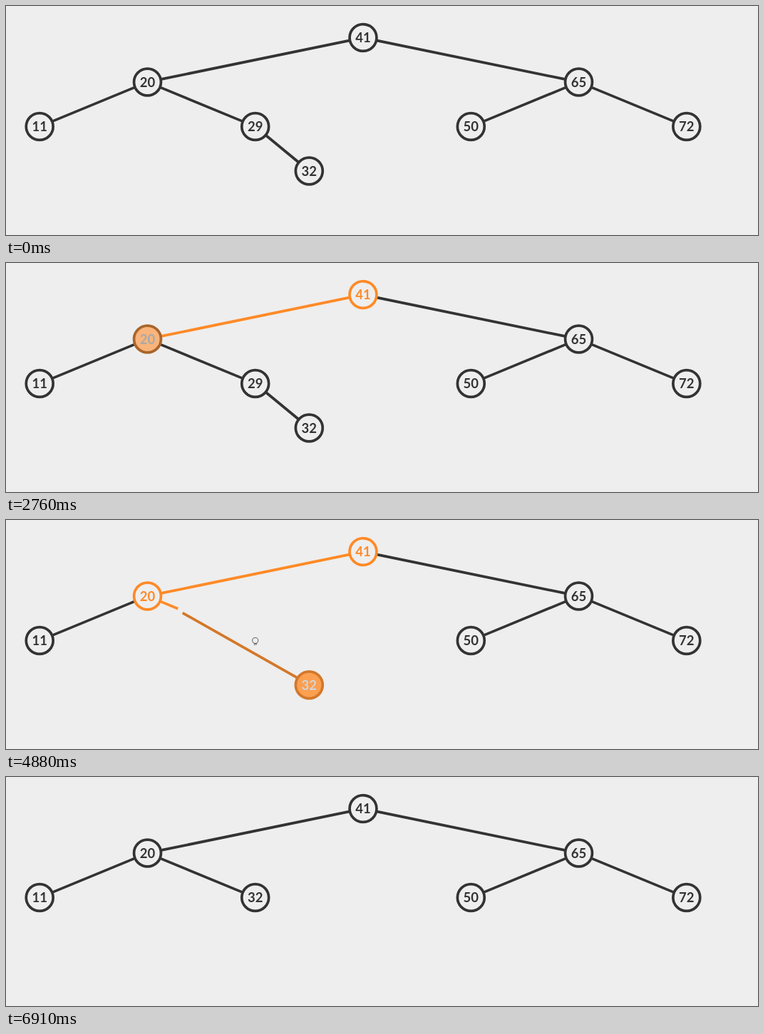
An HTML page for the animation above (7380 ms loop, 1055 by 322 pixels).

```html
<!DOCTYPE html>
<html lang="en">
<head>
<meta charset="utf-8">
<title>Deleting 29 from a binary search tree</title>
<style>
  html, body { margin: 0; width: 100%; height: 100%; overflow: hidden; background: #eee; }
  svg { display: block; width: 1055px; height: 322px; }
  line { stroke: #333; stroke-width: 3.75px; }
  circle { fill: #eee; stroke: #333; }
  text { fill: #333; font-family: Lato, "Open Sans", sans-serif; font-weight: 700; text-anchor: middle; }
</style>
</head>
<body>
<svg id="tree" viewBox="0 0 1055 322"></svg>
<script>
const LOOP = 7380, MOVE = 500, FIRST = 1650;
const RING = 18.95, WEIGHT = 3.7, SIZE = 18.5, TRIM = 20;

// Start time of each step of the deletion
const STEP = { visit41: 1467, to20: 1974, visit20: 2496, to29: 3012, visit29: 3526,
               found: 4048, unlink: 4568, lift: 5080, reset: 5597 };

// Colours: fill, ring, ink
const DARK = [51, 51, 51], PALE = [238, 238, 238], HOT = [255, 138, 39], WHITE = [255, 255, 255];
const BASE = [PALE, DARK, DARK], FULL = [HOT, HOT, WHITE], LIT = [PALE, HOT, HOT];

const SPOT = {
  41: [501, 44.5], 20: [198.5, 107], 65: [803.5, 107], 11: [47.2, 169.5],
  29: [349.7, 169.5], 50: [652.3, 169.5], 72: [954.8, 169.5], 32: [425.3, 232]
};

const svg = document.getElementById('tree');

function make(tag, attrs = {}) {
  const el = document.createElementNS('http://www.w3.org/2000/svg', tag);
  set(el, attrs);
  return svg.appendChild(el);
}

function set(el, attrs) {
  for (const key in attrs) el.setAttribute(key, attrs[key]);
}

// Blends numbers and nested arrays alike
function mix(a, b, p) {
  return Array.isArray(a) ? a.map((v, i) => mix(v, b[i], p)) : a + (b - a) * p;
}

function rgb(c) {
  return `rgb(${c.map(Math.round)})`;
}

function ease(u) {
  u = Math.min(1, Math.max(0, u));
  return u < 0.5 ? 4 * u ** 3 : 1 - 4 * (1 - u) ** 3;
}

// Segment between two node centres, cut back to their rims
function link(a, b) {
  const dx = b[0] - a[0], dy = b[1] - a[1], k = TRIM / Math.hypot(dx, dy);
  return [mix(a, b, k), mix(b, a, k)];
}

function place(line, [a, b], color) {
  set(line, { x1: a[0], y1: a[1], x2: b[0], y2: b[1] });
  line.style.stroke = rgb(color);
}

// An edge in two parts: highlighted up to the front, dark beyond it
function makeEdge(from, to) {
  const span = link(SPOT[from], SPOT[to]), dark = make('line'), lit = make('line');
  return (reach, length, color) => {
    const front = mix(...span, reach * length);
    place(dark, [front, mix(...span, length)], DARK);
    place(lit, [span[0], front], color);
  };
}

function makeNode(key) {
  const ring = make('circle'), label = make('text');
  label.textContent = key;
  return (look = BASE, [x, y] = SPOT[key], scale = 1) => {
    set(ring, { cx: x, cy: y, r: RING * scale });
    ring.style.strokeWidth = WEIGHT * scale + 'px';
    ring.style.fill = rgb(look[0]);
    ring.style.stroke = rgb(look[1]);
    set(label, { x, y: y + 6.6 });
    label.style.fontSize = SIZE * scale + 'px';
    label.style.fill = rgb(look[2]);
  };
}

for (const [a, b] of [[41, 65], [20, 11], [65, 50], [65, 72]]) {
  place(make('line'), link(SPOT[a], SPOT[b]), DARK);
}
const edge20 = makeEdge(41, 20), edge29 = makeEdge(20, 29), edge32 = make('line');
const node = {};
for (const key in SPOT) {
  node[key] = makeNode(key);
  node[key]();
}

const oldLink = link(SPOT[29], SPOT[32]);
const newLink = link(SPOT[20], SPOT[32]);
const endLink = link(SPOT[20], SPOT[29]);

function draw(t) {
  const at = step => t < FIRST ? 0 : ease((t - STEP[step]) / MOVE);
  const chain = (start, ...stages) =>
    stages.reduce((value, [step, next]) => mix(value, next, at(step)), start);

  const trail = chain(HOT, ['reset', DARK]);
  const gone = at('unlink');

  edge20(at('to20'), 1, trail);
  edge29(at('to29'), 1 - gone, trail);
  place(edge32, chain(oldLink, ['unlink', newLink], ['lift', endLink]),
        chain(DARK, ['unlink', HOT], ['reset', DARK]));

  node[41](chain(BASE, ['visit41', FULL], ['to20', LIT], ['reset', BASE]));
  node[20](chain(BASE, ['visit20', FULL], ['to29', LIT], ['reset', BASE]));
  node[29](chain(BASE, ['visit29', FULL], ['found', BASE]), SPOT[29], 1 - gone);
  node[32](chain(BASE, ['unlink', FULL], ['reset', BASE]),
           chain(SPOT[32], ['lift', SPOT[29]]));
}

let origin;
function tick(now) {
  origin ??= now;
  draw((now - origin) % LOOP);
  requestAnimationFrame(tick);
}
draw(0);
requestAnimationFrame(tick);
</script>
</body>
</html>
```
